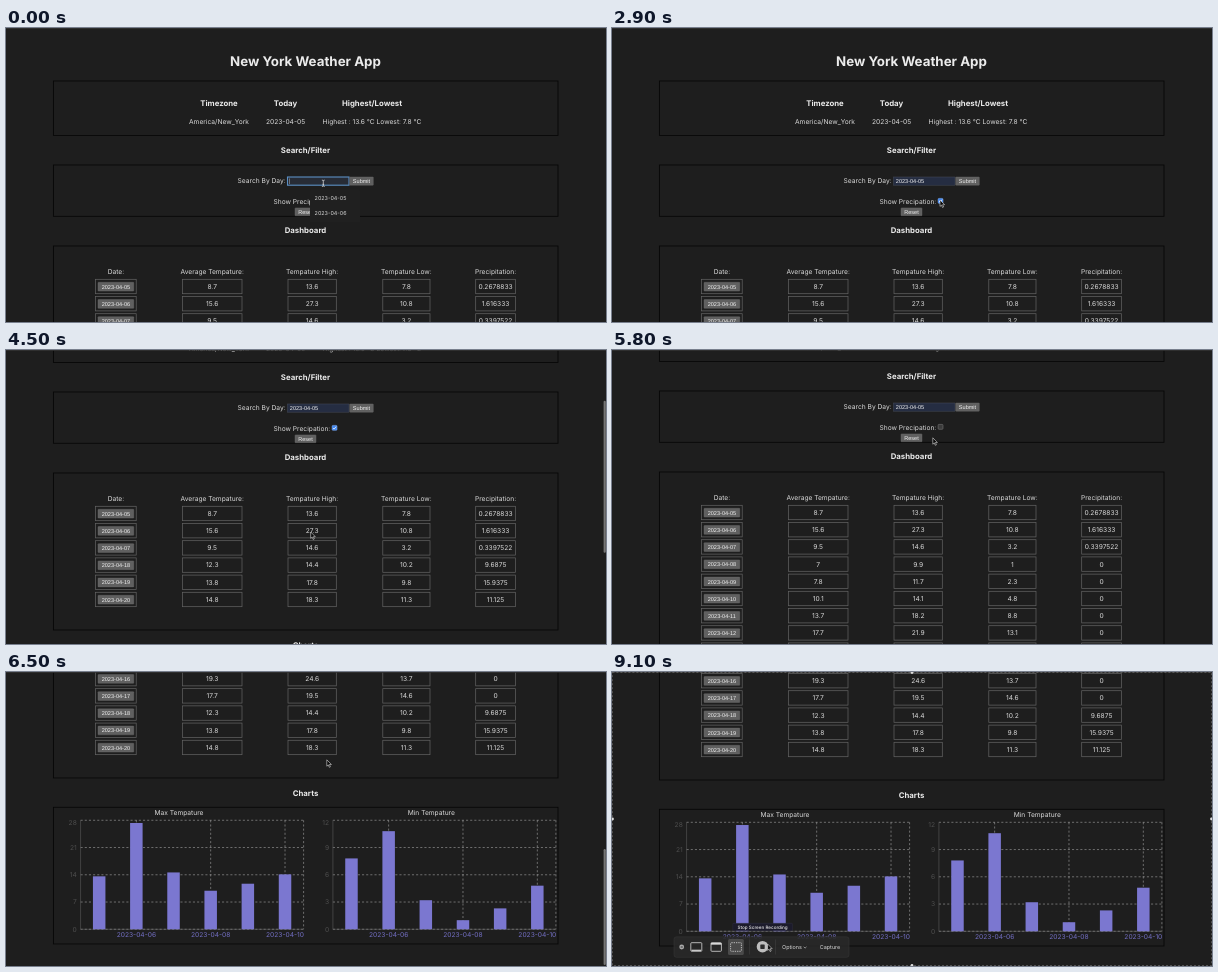
These frames come from a looping animation (600x294 px, 9200 ms). An HTML page:

```html
<!DOCTYPE html>
<html lang="en">
<head>
<meta charset="utf-8">
<title>Weather dashboard</title>
<style>
  html, body { margin: 0; width: 100%; height: 100%; overflow: hidden; background: #1e1e1e; }
  svg { display: block; width: 100vw; height: 100vh; }
  text { font-family: Inter, "Open Sans", sans-serif; fill: #dadada; text-rendering: geometricPrecision; white-space: pre; }
  .b { font-weight: 700; fill: #ececec; }
  .m { font-weight: 500; fill: #ececec; }
  .ui { font-family: "Liberation Sans", Arial, sans-serif; fill: #f2f2f2; }
  .dim { fill: #4e4e4e; }
  .day { fill: #726ec2; }
</style>
</head>
<body>
<svg id="stage" viewBox="0 0 600 294"></svg>
<script>
const LOOP = 9200, STEP = 100;
const BODY = 6.667, H3 = 7.8, UI = 5.556, MENU = 5.42;
const ROW = 17.2, ROW_Y = 258.5, PAGE = 733, VIEW = 294;
const stage = document.getElementById('stage');

function el(parent, tag, attrs = {}, content) {
  const node = document.createElementNS('http://www.w3.org/2000/svg', tag);
  for (const k in attrs) node.setAttribute(k, attrs[k]);
  if (content !== undefined) node.textContent = content;
  return parent.appendChild(node);
}
const group = parent => el(parent, 'g');
// y is the middle of the capitals
const label = (p, s, x, y, size = BODY, cls = '', anchor = 'middle') =>
  el(p, 'text', { x, y: y + size * 0.36, 'font-size': size, class: cls, 'text-anchor': anchor }, s);
const rect = (p, x, y, x2, y2, attrs) =>
  el(p, 'rect', { x, y, width: x2 - x, height: y2 - y, ...attrs });
const path = (p, d, attrs) => el(p, 'path', { d, fill: 'none', ...attrs });
const dot = (p, cx, cy, r, fill) => el(p, 'circle', { cx, cy, r, fill });
const panel = (p, y, y2) => rect(p, 47.4, y, 552, y2, { fill: 'none', stroke: '#060606', 'stroke-width': 0.83 });
function button(p, s, x, y, x2, y2) {
  rect(p, x, y, x2, y2, { fill: '#606060', stroke: '#6c6c6c', 'stroke-width': 0.4, rx: 0.5 });
  label(p, s, (x + x2) / 2, (y + y2) / 2, UI, 'ui');
}
const show = (node, on) => node.setAttribute('display', on ? 'inline' : 'none');
const move = (node, x, y) => node.setAttribute('transform', `translate(${x} ${y})`);

// Page
const page = group(stage);
label(page, 'New York Weather App', 299.5, 33.5, 13.333, 'b');

panel(page, 53, 107.5);
[['Timezone', 'America/New_York', 213], ['Today', '2023-04-05', 279.5],
 ['Highest/Lowest', 'Highest : 13.6 °C Lowest: 7.8 °C', 366]].forEach(([head, value, x]) => {
  label(page, head, x, 75, H3, 'b');
  label(page, value, x, 94);
});

label(page, 'Search/Filter', 299.5, 122, H3, 'b');
panel(page, 137, 188.3);
label(page, 'Search By Day:', 231.6, 152.8, BODY, '', 'start');
const field = rect(page, 281.5, 149, 343, 157.2, {});
const typed = label(page, '2023-04-05', 283.8, 153, UI, 'ui', 'start');
const caret = rect(page, 283.6, 150.4, 284, 156, { fill: '#ddd' });
button(page, 'Submit', 343.7, 149, 367.3, 157.2);
label(page, 'Show Precipation:', 324.3, 173.3, BODY, '', 'end');
const box = rect(page, 326.1, 170.4, 331, 175.3, { rx: 0.9, 'stroke-width': 0.5 });
const check = path(page, 'M327.1 173l1.1 1.1 1.9-2.5', { stroke: '#fff', 'stroke-width': 0.8 });
button(page, 'Reset', 289, 179.9, 310, 187.7);

label(page, 'Dashboard', 299.5, 202.5, H3, 'b');
const dash = panel(page, 218, 300);

// Table
const COLS = [
  ['Date:', 89.6, 130.2], ['Average Tempature:', 176.4, 236], ['Tempature High:', 282, 330.3],
  ['Tempature Low:', 376.8, 424], ['Precipitation:', 469.7, 509.4]
];
const mid = ([, x, x2]) => (x + x2) / 2;
COLS.forEach(col => label(page, col[0], mid(col), 244));

// Average, high, low and, on wet days, precipitation
const before = [
  [8.7, 13.6, 7.8, 0.2678833], [15.6, 27.3, 10.8, 1.616333], [9.5, 14.6, 3.2, 0.3397522],
  [7, 9.9, 1], [7.8, 11.7, 2.3], [10.1, 14.1, 4.8], [13.7, 18.2, 8.8], [17.7, 21.9, 13.1]
];
const after = [
  [19.3, 24.6, 13.7], [17.7, 19.5, 14.6],
  [12.3, 14.4, 10.2, 9.6875], [13.8, 17.8, 9.8, 15.9375], [14.8, 18.3, 11.3, 11.125]
];
const between = [1, 2, 3].map(k => before[7].map((v, i) => +(v + (after[0][i] - v) * k / 4).toFixed(1)));
const DAYS = [...before, ...between, ...after];
const dateOf = i => '2023-04-' + String(i + 5).padStart(2, '0');

const rows = DAYS.map((day, i) => {
  const g = group(page);
  COLS.forEach((col, c) => {
    rect(g, col[1], -7.2, col[2], 7.2, { fill: 'none', stroke: '#646464', 'stroke-width': 0.7 });
    if (c) label(g, day[c - 1] ?? 0, mid(col), 0);
  });
  button(g, dateOf(i), 92, -4.2, 127.8, 4.6);
  return g;
});

// Charts, placed relative to the end of the table
const charts = group(page);
label(charts, 'Charts', 299.5, 14.8, H3, 'b');
panel(charts, 29.3, 166);
function chart(title, left, column, step) {
  const top = 42.3, base = 151.3, right = left + 223, band = 223 / 6;
  const center = i => left + band * (i + 0.5);
  const grid = { stroke: '#b0b0b0', 'stroke-width': 0.55, 'stroke-dasharray': '2.08 2.08' };
  label(charts, title, left + 98.4, 34.4);
  for (let k = 0; k <= 4; k++) {
    const y = base - (base - top) * k / 4;
    path(charts, `M${left} ${y}H${right}`, grid);
    label(charts, k * step, left - 3.8, Math.max(y, top + 2.4), BODY, 'dim', 'end');
  }
  [1, 3, 5].forEach(i => path(charts, `M${center(i)} ${top}V${base}`, grid));
  path(charts, `M${right} ${top}V${base}`, grid);
  path(charts, `M${left} ${top}V${base}H${right}`, { stroke: '#666', 'stroke-width': 0.5 });
  for (let i = 0; i < 6; i++) {
    const x = center(i), h = (base - top) * DAYS[i][column] / (step * 4);
    rect(charts, x - 6.25, base - h, x + 6.25, base, { fill: '#7b77d0' });
    if (i % 2) label(charts, dateOf(i), x, 156.9, BODY, 'day');
  }
}
chart('Max Tempature', 74.6, 1, 7);
chart('Min Tempature', 326.9, 2, 3);

// Suggestions
const list = group(stage);
rect(list, 304, 161.5, 354, 194, { fill: '#202020', rx: 1 });
const hover = rect(list, 304, 163, 354, 178, { fill: '#3a3a3a' });
[0, 1].forEach(i => label(list, dateOf(i), 308.6, 170.5 + 15 * i, MENU, '', 'start'));

rect(stage, 0, 0, 600, 0.8, { fill: '#343434' });
const thumb = rect(stage, 597.6, 0, 599.8, 100, { rx: 1.1, fill: '#757575' });

// Screen recording controls
const tools = group(stage);
const line = { fill: 'none', stroke: '#d8d8d8', 'stroke-width': 0.8, rx: 0.8 };
rect(tools, 0.4, 0.4, 599.6, 293.6, { fill: 'none', stroke: '#808080', 'stroke-width': 0.6, 'stroke-dasharray': '2 2' });
[[0.5, 147], [599.5, 147], [300, 0.5], [300, 293.5]].forEach(([x, y]) => dot(tools, x, y, 1.4, '#ddd'));
rect(tools, 62, 264.8, 237, 285.3, { rx: 2.5, fill: '#282828', 'fill-opacity': 0.88, stroke: '#383838', 'stroke-width': 0.5 });
dot(tools, 69.7, 275, 2.4, '#aaa');
path(tools, 'M68.8 274.1l1.8 1.8m0-1.8l-1.8 1.8', { stroke: '#2b2b2b', 'stroke-width': 0.6 });
rect(tools, 116, 267, 131.8, 283, { rx: 1.5, fill: '#4a4a4a' });
rect(tools, 78.8, 270.7, 89.8, 279.3, line);
path(tools, 'M79.5 278.3H89', { ...line, 'stroke-width': 1.2 });
rect(tools, 99, 270.7, 109.4, 279.3, line);
path(tools, 'M99 271.8H109.4', { ...line, 'stroke-width': 1.7 });
rect(tools, 118.6, 270.7, 129.4, 279.3, { ...line, 'stroke-dasharray': '1.3 1' });
path(tools, 'M137.5 267.5V282.5M163.5 267.5V282.5', { stroke: '#444', 'stroke-width': 0.5 });
dot(tools, 150.5, 274.7, 5.8, '#bdbdbd');
rect(tools, 148.3, 272.5, 152.7, 276.9, { fill: '#2b2b2b', rx: 0.6 });
label(tools, 'Options', 170, 275.3, MENU, '', 'start');
path(tools, 'M191.7 274.8l1.4 1.3 1.4-1.3', { stroke: '#dadada', 'stroke-width': 0.6 });
label(tools, 'Capture', 218, 275.3, MENU);
const tip = group(stage);
rect(tip, 120.8, 251.3, 180.4, 258.8, { fill: '#1c1b2b', rx: 0.8, stroke: '#35344a', 'stroke-width': 0.4 });
label(tip, 'Stop Screen Recording', 150.6, 255.1, 4.58, 'm');

// Pointers, with the hot spot at 0,0
const pointer = group(stage);
const edge = { fill: '#080808', stroke: '#ddd', 'stroke-width': 0.6, 'stroke-linejoin': 'round' };
const arrow = path(pointer, 'M0 0V6.4L1.5 5.1 2.5 7.5 3.6 7 2.6 4.7H4.6Z', edge);
const hand = path(pointer, 'M-.6 0Q0-.8.6 0V2.4L3 3Q3.6 3.3 3.4 4.2L2.7 6.8H-.8L-2.5 4.2Q-2.4 3.2-1.5 3.6L-.6 4.4Z', edge);
const beam = path(pointer, 'M-1.4-3.2Q0-3.2 0-2.4Q0-3.2 1.4-3.2M0-2.4V2.4M-1.4 3.2Q0 3.2 0 2.4Q0 3.2 1.4 3.2M-.8 1H.8',
  { stroke: '#e4e4e4', 'stroke-width': 0.7 });

// Motion
const clamp = v => Math.min(1, Math.max(0, v));
const ease = (t, from, to) => { const f = clamp((t - from) / (to - from)); return f * f * (3 - 2 * f); };
const within = (t, from, to) => t >= from && t < to;

// Pointer moves: start, end, x, y
const MOVES = [
  [100, 400, 321, 170], [600, 1200, 360, 150.5], [1300, 1800, 299, 181.4],
  [2300, 2700, 311, 153], [2700, 2900, 328, 172], [2900, 3400, 304.7, 182],
  [4800, 5100, 329, 54], [5100, 5300, 328, 76], [5300, 5600, 320.8, 87.8],
  [6700, 7300, 311.9, 94.3], [7800, 8800, 200, 268], [8800, 9100, 155.6, 272]
];
function mouseAt(t) {
  let x = 317.3, y = 155.3;
  for (const [from, to, tx, ty] of MOVES) {
    const f = ease(t, from, to);
    x += (tx - x) * f;
    y += (ty - y) * f;
  }
  return [x, y];
}

// A flick that coasts, then a throw that bounces at the page end
function scrollAt(t) {
  if (t < 5800) return 96 * (1 - Math.exp(-Math.max(0, t - 3850) / 142));
  if (t < 6200) return 96 + 358 * ease(t, 5800, 6200);
  return 439 + 15 * Math.exp((6200 - t) / 150);
}
const thumbAlpha = t => [[3900, 5200], [5900, 7200]].reduce(
  (a, [from, to]) => within(t, from, to) ? clamp((to - t) / 400) : a, 0);

function draw(t) {
  const scroll = scrollAt(t), [mx, my] = mouseAt(t);
  const single = within(t, 1100, 1900), wet = within(t, 2900, 5300), focus = t < 1100;

  let count = 0;
  rows.forEach((row, i) => {
    const on = single ? i === 0 : !wet || DAYS[i][3] > 0;
    show(row, on);
    if (on) move(row, 0, ROW_Y + ROW * count++);
  });
  const end = ROW_Y + ROW * (count - 1) + 30.5;
  dash.setAttribute('height', end - 218);
  move(charts, 0, end);
  move(page, 0, -scroll);

  field.setAttribute('fill', t < 300 ? '#272c36' : '#252d42');
  field.setAttribute('stroke', focus ? '#5b8fc4' : '#434a58');
  field.setAttribute('stroke-width', focus ? 1.1 : 0.5);
  show(typed, t >= 300);
  show(caret, t < 300);
  box.setAttribute('fill', wet ? '#3f86f2' : '#3b3b3b');
  box.setAttribute('stroke', wet ? '#8ab8ff' : '#808080');
  show(check, wet);

  show(list, t < 500);
  show(hover, t >= 300);
  show(tools, t >= 8100);
  show(tip, t >= 9000);

  const height = PAGE - ROW * (DAYS.length - count);
  thumb.setAttribute('y', Math.min(scroll, height - VIEW) / height * VIEW + 1);
  thumb.setAttribute('height', VIEW * VIEW / height - 2);
  thumb.setAttribute('opacity', thumbAlpha(t));

  const over = (x, y, x2, y2) => mx >= x && mx <= x2 && my + scroll >= y && my + scroll <= y2;
  const onField = over(281, 148, 343, 157.5);
  const onButton = over(343.5, 149, 367.5, 157.5) || over(289, 179.5, 304, 188);
  show(beam, onField);
  show(hand, onButton);
  show(arrow, !onField && !onButton);
  move(pointer, mx, my);
}

const start = performance.now();
function frame() {
  const t = (performance.now() - start) % LOOP;
  draw(Math.floor(t / STEP) * STEP);
  requestAnimationFrame(frame);
}
frame();
</script>
</body>
</html>
```
